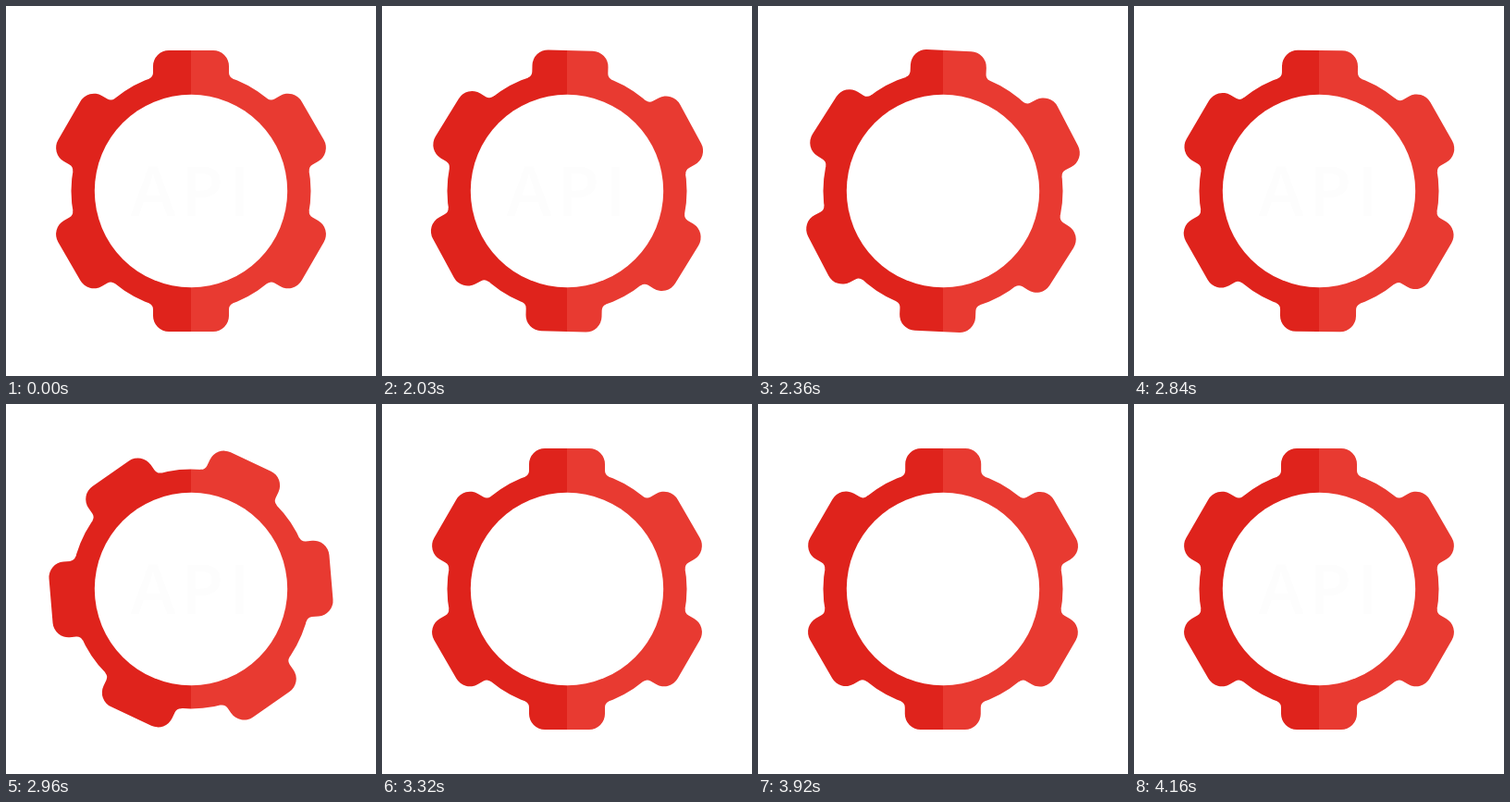
An HTML page with a canvas for the animation above (4190 ms loop, 400 by 400 pixels).

```html
<!DOCTYPE html>
<html lang="en">
<head>
<meta charset="utf-8">
<title>Gear</title>
<style>
  html, body { margin: 0; width: 100%; height: 100%; overflow: hidden; background: #fff; }
  canvas { display: block; width: 100vw; height: 100vh; }
</style>
</head>
<body>
<canvas id="stage" width="400" height="400"></canvas>
<script>
const LOOP = 4190, STEP = 30;
const MID = 200, RING = 129.5, HOLE = 104.2;

// Each turn: start time in ms and the phase of its first step.
const TURNS = [
  { start: 2030, phase: 0.95 },
  { start: 2840, phase: 0.5 },
  { start: 3650, phase: 0.05 }
];
// Swing past one tooth, then settle back (position in steps, angle in degrees).
const PEAK = { at: 10.4, angle: 63 };
const REST = { at: 16.4, angle: 60 };

// Spans in ms where the faint label shows.
const LABEL = [[0, 2200], [2840, 3140], [3960, LOOP]];

const ctx = document.getElementById('stage').getContext('2d');

const tooth = new Path2D(
  'M-50-112L-45.5-121.3Q-41-123.3-41-128V-135A17 17 0 0 1-24-152' +
  'H24A17 17 0 0 1 41-135V-128Q41-123.3 45.5-121.3L50-112Z');

const paint = ctx.createLinearGradient(0, 0, 400, 0);
[[0, '#df231c'], [0.5, '#df231c'], [0.5, '#e83a31'], [1, '#e83a31']]
  .forEach(([stop, color]) => paint.addColorStop(stop, color));

const smooth = p => {
  p = Math.min(1, Math.max(0, p));
  return p * p * (3 - 2 * p);
};

function angleAt(ms) {
  const turn = TURNS.filter(t => ms >= t.start).pop();
  if (!turn) return 0;
  const s = Math.floor((ms - turn.start) / STEP) + turn.phase;
  if (s >= REST.at) return 0;
  if (s < PEAK.at) return PEAK.angle * smooth(s / PEAK.at);
  const back = smooth((s - PEAK.at) / (REST.at - PEAK.at));
  return PEAK.angle + (REST.angle - PEAK.angle) * back;
}

function disc(path, radius) {
  path.arc(MID, MID, radius, 0, 2 * Math.PI);
  return path;
}

function draw(ms) {
  const angle = angleAt(ms);
  const gear = disc(new Path2D(), RING);
  for (let i = 0; i < 6; i++) {
    gear.addPath(tooth, new DOMMatrix().translate(MID, MID).rotate(angle + i * 60));
  }
  ctx.fillStyle = '#fff';
  ctx.fillRect(0, 0, 400, 400);
  ctx.fillStyle = paint;
  ctx.fill(gear);
  ctx.fillStyle = '#fff';
  ctx.fill(disc(new Path2D(), HOLE));

  if (LABEL.some(([from, to]) => ms >= from && ms < to)) {
    ctx.font = '600 74px "Open Sans", sans-serif';
    ctx.letterSpacing = '6px';
    ctx.textAlign = 'center';
    ctx.fillStyle = '#fdfdfd';
    ctx.fillText('API', MID + 2, 227);
  }
}

const begin = performance.now();
function frame() {
  draw((performance.now() - begin) % LOOP);
  requestAnimationFrame(frame);
}
frame();
</script>
</body>
</html>
```
